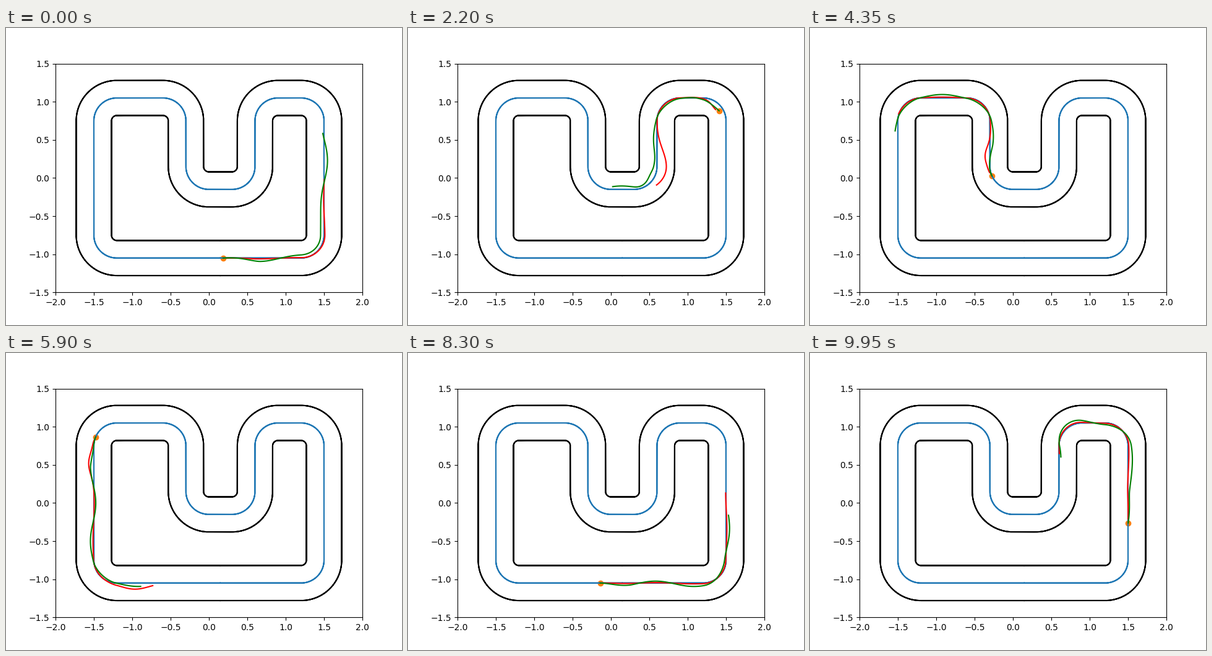
A matplotlib script for the animation above (10 s loop, 640x480 px).

```python
import numpy as np
import matplotlib.pyplot as plt
from matplotlib.animation import FuncAnimation

FRAMES, INTERVAL = 200, 50
HALF_WIDTH = 0.23
RADIUS = 0.3
LAPS = 2

# Track: straight lengths, each followed by a quarter turn (+1 left, -1 right)
STRAIGHTS = [1.05, 1.5, 0.3, 0.6, 0.3, 0.6, 0.6, 1.5, 1.35]
TURNS = [1, 1, 1, -1, -1, 1, 1, 1]

# The car's arc length at a few moments
CAR_FRAME = [0, 44, 87, 118, 148, 166, 199]
CAR_S = [0.035, 3.19, 5.98, 8.13, 10.14, 11.28, 13.58]

# Bulges of each plan: arc length, offset to the left, width
RED_BULGES = [(3.25, 0.08, 0.2), (4.85, 0.12, 0.33), (6.25, 0.065, 0.18),
              (8.47, -0.06, 0.2), (10.45, -0.07, 0.25)]
GREEN_BULGES = [(1.5, 0.09, 0.35), (3.35, 0.07, 0.3),
                (5.0, -0.09, 0.2), (14.1, -0.05, 0.3)]


def build_track():
    """Centre line of one lap as arc length, x, y and heading."""
    knots, headings = [0.0], [0.0]
    for length, turn in zip(STRAIGHTS, TURNS + [0]):
        knots += [knots[-1] + length]
        headings += [headings[-1]]
        if turn:
            knots += [knots[-1] + RADIUS * np.pi / 2]
            headings += [headings[-1] + turn * np.pi / 2]
    s = np.linspace(0, knots[-1], 2400)
    heading = np.interp(s, knots, headings)
    mid = (heading[1:] + heading[:-1]) / 2
    x = 0.15 + np.append(0, np.cumsum(s[1] * np.cos(mid)))
    y = -1.05 + np.append(0, np.cumsum(s[1] * np.sin(mid)))
    return s, x, y, heading


S, X, Y, HEADING = build_track()
U = np.linspace(0, 1, 100)


def place(s, d):
    """World position at arc length s, shifted d to the left."""
    s = np.mod(s, S[-1])
    h = np.interp(s, S, HEADING)
    return (np.interp(s, S, X) - d * np.sin(h),
            np.interp(s, S, Y) + d * np.cos(h))


def offset(s, bulges, mean, sway):
    """Sideways drift: a wave that sets in ahead of the car, plus bulges."""
    d = (mean + sway * np.cos(2 * np.pi * s)) * np.minimum(1, 6 * U)
    for centre, height, width in bulges:
        d = d + height * np.exp(-((s - centre) / width)**2)
    return d


def red_plan(frame, car_s):
    length = 2.31 - 0.43 * np.cos(2 * np.pi * (frame - 45) / 210)
    s = car_s + 0.05 + U * (length - 0.05)
    return place(s, offset(s, RED_BULGES, -0.003, 0.008))


def green_plan(frame, car_s):
    length = 2.4 + 0.42 * np.exp(-frame / 15)
    s = car_s + U * length
    return place(s, offset(s, GREEN_BULGES, -0.01, 0.035))


fig, ax = plt.subplots(figsize=(6.4, 4.8), dpi=100)
ax.set_xlim(-2, 2)
ax.set_ylim(-1.5, 1.5)
for side, color in ((0, "C0"), (HALF_WIDTH, "k"), (-HALF_WIDTH, "k")):
    x, y = place(S[:-1], side)
    ax.plot(np.tile(x, LAPS), np.tile(y, LAPS), color=color)
car = ax.scatter([0], [0], color="C1")
red_line, = ax.plot([], [], color="r")
green_line, = ax.plot([], [], color="g")


def update(frame):
    car_s = np.interp(frame, CAR_FRAME, CAR_S)
    x, y = green_plan(frame, car_s)
    green_line.set_data(x, y)
    car.set_offsets([(x[0], y[0])])
    red_line.set_data(*red_plan(frame, car_s))
    return car, red_line, green_line


anim = FuncAnimation(fig, update, frames=FRAMES, interval=INTERVAL,
                     repeat=True, repeat_delay=0)
plt.show()
```
